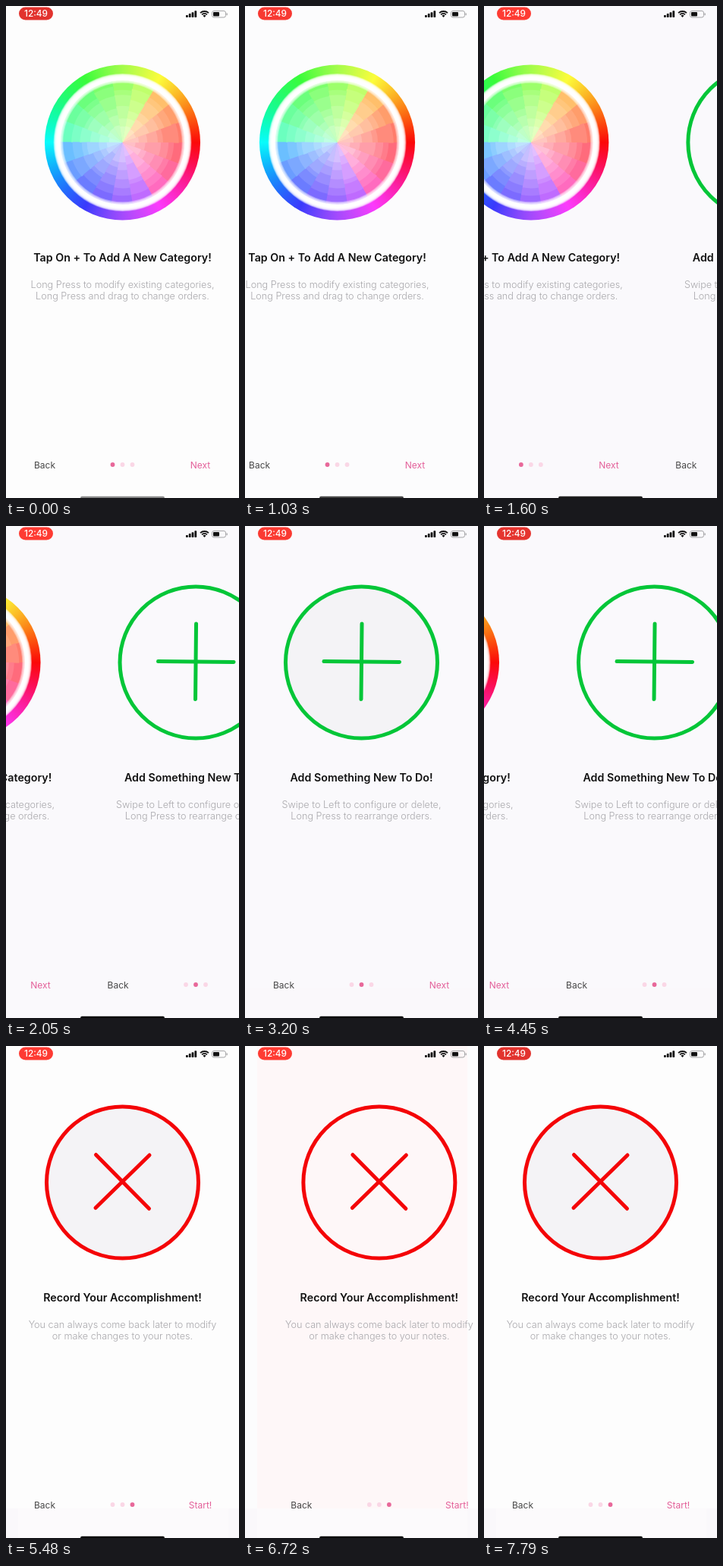
Recreate the animation shown at these times as an HTML page with a canvas. Size 307x649 px, loop 8000 ms.

```html
<!DOCTYPE html>
<html lang="en">
<head>
<meta charset="utf-8">
<title>Onboarding</title>
<style>
html, body { margin: 0; width: 100%; height: 100%; overflow: hidden; background: #fdfdfd; }
canvas { display: block; width: 307px; height: 649px; }
</style>
</head>
<body>
<canvas id="stage"></canvas>
<script>
const W = 307, H = 649, LOOP = 8000, CX = 153.5, CY = 180, TAU = Math.PI * 2;
const INK = '#111', GREY = '#a5a5a7', ROSE = '#e35f99';
const canvas = document.getElementById('stage');
const ratio = window.devicePixelRatio || 1;
canvas.width = W * ratio;
canvas.height = H * ratio;
const ctx = canvas.getContext('2d');

const PAGES = [
  { title: 'Tap On + To Add A New Category!', next: 'Next', art: drawWheel,
    lines: ['Long Press to modify existing categories,', 'Long Press and drag to change orders.'] },
  { title: 'Add Something New To Do!', next: 'Next', art: drawPlus,
    lines: ['Swipe to Left to configure or delete,', 'Long Press to rearrange orders.'] },
  { title: 'Record Your Accomplishment!', next: 'Start!', art: drawCross,
    lines: ['You can always come back later to modify', 'or make changes to your notes.'] }
];

const clamp = v => Math.min(1, Math.max(0, v));
const mix = (a, b, p) => a + (b - a) * p;
const wobble = n => { const s = Math.sin(n * 12.9898) * 43758.5453; return s - Math.floor(s) - 0.5; };

function ease(t, from, to) {
  const p = clamp((t - from) / (to - from));
  return p * p * (3 - 2 * p);
}

// Each swipe starts with a slow pull, then the page glides to its place.
function scrollAt(t) {
  const peek = 32, pull = 110, nudge = 28;
  return -peek * ease(t, 100, 1050) - (W - peek) * ease(t, 1150, 2650)
    + pull * ease(t, 3400, 4250) - (W + pull) * ease(t, 4300, 5100)
    + nudge * (ease(t, 6350, 6850) - ease(t, 6950, 7450));
}

function rect(x, y, w, h, color, r = 0) {
  ctx.fillStyle = color;
  ctx.beginPath();
  ctx.roundRect(x, y, w, h, r);
  ctx.fill();
}

function disc(x, y, r, color) {
  ctx.fillStyle = color;
  ctx.beginPath();
  ctx.arc(x, y, r, 0, TAU);
  ctx.fill();
}

function ring(x, y, r, width, color, from = 0, to = TAU) {
  ctx.strokeStyle = color;
  ctx.lineWidth = width;
  ctx.beginPath();
  ctx.arc(x, y, r, from, to);
  ctx.stroke();
}

function wedge(x, y, r, from, to, color) {
  ctx.fillStyle = color;
  ctx.beginPath();
  ctx.moveTo(x, y);
  ctx.arc(x, y, r, from, to);
  ctx.fill();
}

function line(x1, y1, x2, y2) {
  ctx.beginPath();
  ctx.moveTo(x1, y1);
  ctx.lineTo(x2, y2);
  ctx.stroke();
}

function text(str, x, y, size, weight, color, align = 'center') {
  ctx.font = `${weight} ${size}px Inter, "Open Sans", sans-serif`;
  ctx.textAlign = align;
  ctx.fillStyle = color;
  ctx.fillText(str, x, y);
}

function drawWheel() {
  const sectors = 18, step = TAU / sectors;
  const hues = ctx.createConicGradient(0, CX, CY);
  for (let i = 0; i <= 36; i++) {
    const light = 64 - 13 * Math.cos(i / 36 * TAU) ** 2;
    hues.addColorStop(i / 36, `hsl(${360 - i * 10}, 97%, ${light}%)`);
  }
  disc(CX, CY, 102.5, hues);
  for (let r = 91; r > 86; r--) disc(CX, CY, r, 'rgba(255,255,255,.35)');

  for (let layer = 0; layer < 6; layer++) {
    for (let i = 0; i < sectors; i++) {
      const hue = (i + 0.5) * 360 / sectors;
      const primary = Math.round(hue / 120) * 120;
      const shown = mix(primary, hue, 0.68);
      const radius = layer ? 82 - layer * 12 + wobble(i * 7 + layer) * 10 : 82;
      const light = 71 + layer * 3.3;
      wedge(CX, CY, radius, -(i + 1) * step, -i * step + 0.01, `hsl(${shown}, 100%, ${light}%)`);
    }
  }
  for (let w = 4; w <= 12; w += 2) ring(CX, CY, 84.2, w, 'rgba(255,255,255,.35)');
  ring(CX, CY, 84.2, 4, '#fff');
}

function drawSign(color, settled, strokes) {
  if (settled) disc(CX, CY, 100, '#f4f3f6');
  ring(CX, CY, 100, 5, color);
  ctx.lineCap = 'round';
  for (const s of strokes) line(...s);
  ctx.lineCap = 'butt';
}

function drawPlus(settled) {
  drawSign('#04c638', settled, [[104, 178.5, 203.5, 179.5], [154, 129, 153, 228.5]]);
}

function drawCross(settled) {
  drawSign('#f40407', settled, [[118.5, 143.5, 188.5, 214.5], [189, 144, 118, 213.5]]);
}

function drawPage(page, index, x) {
  ctx.save();
  ctx.translate(x, 0);
  page.art(Math.abs(x) < 0.5);
  text(page.title, CX, 336.5, 14.25, 600, INK);
  page.lines.forEach((s, i) => text(s, CX, 371.5 + i * 15.5, 12.65, 300, '#a9a8ac'));
  text('Back', 37, 609.5, 12, 400, '#484848', 'left');
  text(page.next, 256, 609.5, 12, 400, ROSE);
  PAGES.forEach((_, i) => disc(140.5 + i * 13, 605, 2.9, i === index ? '#e8689a' : '#fad7e6'));
  ctx.restore();
}

// The middle page has a cooler backdrop; nudging the last one tints it pink.
function drawBackground(t, scroll) {
  const cool = clamp(3 * (1 - Math.abs(scroll + W) / W));
  rect(0, 0, W, H, `rgb(${mix(253, 250, cool)}, ${mix(253, 249, cool)}, ${mix(253, 251.5, cool)})`);
  if (t > 2400) rect(0, 610, W, 39, '#faf8fb');
  if (t > 5050) rect(16, 610, 277, 39, '#fcfafc');
  if (t > 6000 && scroll > -2 * W + 0.5) rect(16, 0, 277, 610, '#fef7f8');
}

function drawStatus(t) {
  const dim = Math.max(0, Math.cos((t - 200) / 3900 * TAU));
  rect(17, 1.5, 45, 17, `rgb(${254 - 30 * dim}, ${59 - 8 * dim}, ${51 - 5 * dim})`, 8.5);
  text('12:49', 39.5, 14.2, 11.8, 500, '#fff');
  for (let i = 0; i < 4; i++) rect(237 + i * 3.8, 12 - i * 1.9, 2.8, 3 + i * 1.9, INK, 0.7);

  const left = -TAU * 0.37, right = -TAU * 0.13;
  for (const r of [8, 5]) ring(261.5, 15, r, 1.8, INK, left, right);
  wedge(261.5, 15, 3, left, right, INK);

  ctx.strokeStyle = GREY;
  ctx.lineWidth = 1;
  ctx.beginPath();
  ctx.roundRect(271.5, 6.5, 18, 8.5, 2.5);
  ctx.stroke();
  rect(273, 8, 8, 5.5, INK, 1);
  rect(290.5, 9.3, 1.3, 3, GREY, 0.6);
}

function drawHomeBar(t) {
  const g = 136 * (1 - clamp(t / 2100));
  rect(98, 646.7, 111, 4.5, `rgb(${g}, ${g}, ${g})`, 2.2);
}

function render(t) {
  const scroll = scrollAt(t);
  ctx.setTransform(ratio, 0, 0, ratio, 0, 0);
  drawBackground(t, scroll);
  PAGES.forEach((page, i) => {
    const x = scroll + i * W;
    if (Math.abs(x) < W) drawPage(page, i, x);
  });
  drawStatus(t);
  drawHomeBar(t);
}

const began = performance.now();
function loop() {
  render((performance.now() - began) % LOOP);
  requestAnimationFrame(loop);
}
loop();
</script>
</body>
</html>
```
